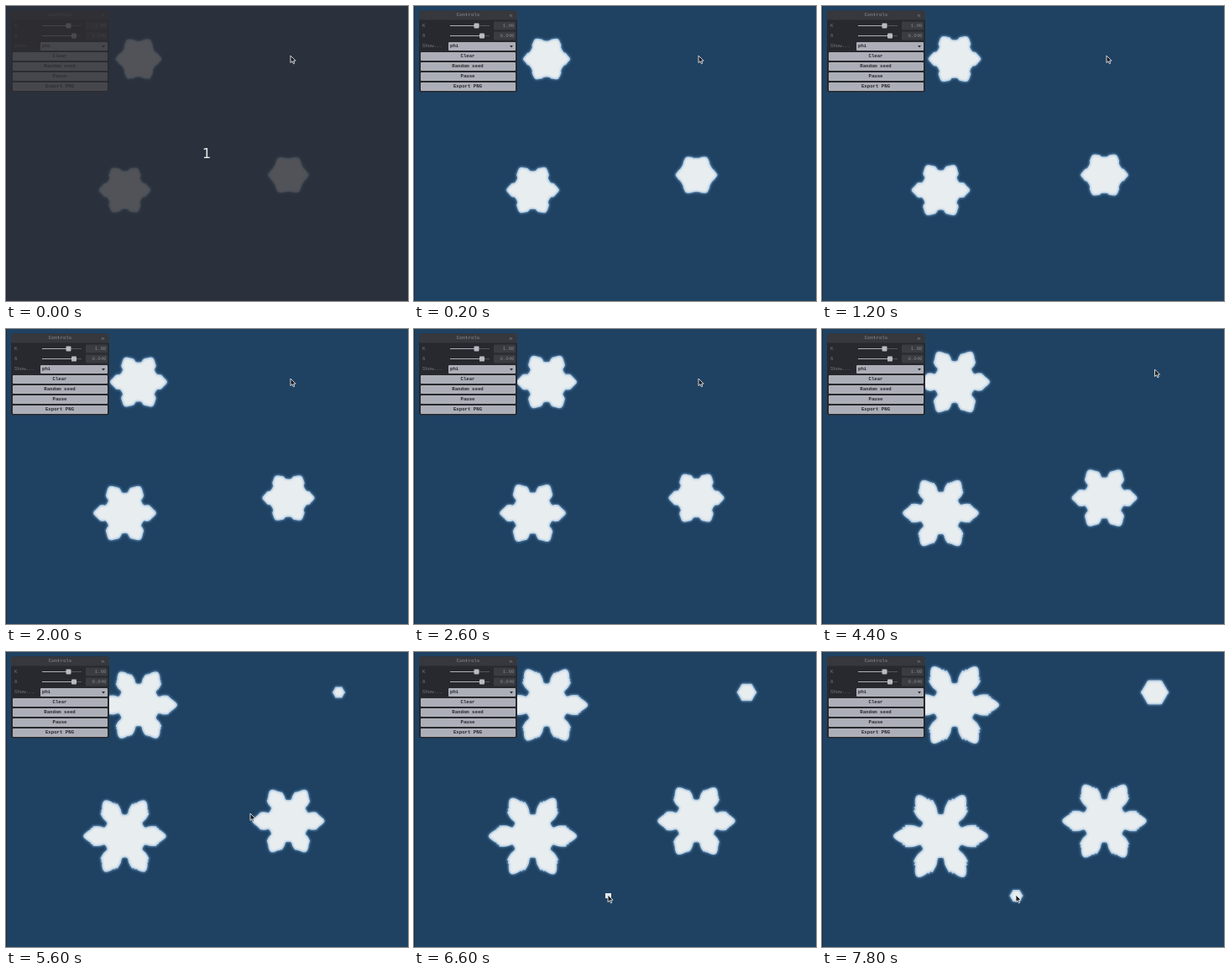
Recreate the animation shown at these times as an HTML page with a canvas. Size 479 px wide and 351 px high, loop 8 s.

```html
<!DOCTYPE html>
<html lang="en">
<head>
<meta charset="utf-8">
<title>Snow crystals</title>
<style>
html, body { margin: 0; width: 100%; height: 100%; overflow: hidden; background: #1f4263; }
canvas { display: block; }
</style>
</head>
<body>
<canvas id="stage" width="479" height="351"></canvas>
<script>
const ctx = document.getElementById('stage').getContext('2d');
const W = 479, H = 351, LOOP = 8000, STEP = 200;
const FONT = '"Liberation Mono", monospace';
const SNOW = '#e8edf0', RIM = 'rgba(112,163,207,0.72)';

// Seeds with a radius have been growing since before the loop starts.
const crystals = [
  { x: 158, y: 63, r: 28 },
  { x: 141.5, y: 219, r: 31.5 },
  { x: 336.5, y: 201, r: 25 },
  { x: 396.5, y: 48, born: 4.45 },
  { x: 231.5, y: 290, born: 6.55 }
];

// Pointer stops: time, x, y
const pointer = [
  [0, 338.5, 58.5], [2800, 338.5, 58.5], [3400, 396, 47.5], [5100, 396, 47.5],
  [5600, 290.5, 191.5], [6000, 247, 264], [6300, 230.5, 288.5], [8000, 230.5, 288.5]
];

function box(x, y, w, h, color, r = 0) {
  ctx.fillStyle = color;
  ctx.beginPath();
  ctx.roundRect(x, y, w, h, r);
  ctx.fill();
}

function text(str, x, y, color, align = 'left', weight = 'normal', size = 5.7, family = FONT) {
  ctx.font = `${weight} ${size}px ${family}`;
  ctx.textAlign = align;
  ctx.textBaseline = 'middle';
  ctx.fillStyle = color;
  ctx.fillText(str, x, y);
}

// One side of an arm lying on the x axis, from near the tip down to the notch.
function armSide(R) {
  const over = Math.max(0, R - 20);
  const notch = Math.min(0.866 * R, 17.3 + 9 * (1 - Math.exp(-over / 13)));
  const fit = Math.min(1, R / 17);
  const rough = Math.max(0, R - 38) * 0.07;
  const outer = [R * (0.866 - 0.0019 * over), 0.3 * R];
  const shoulder = [R * (0.866 - 0.0038 * over), (4.5 + 0.1 * Math.max(0, R - 17)) * fit];
  const pts = [outer];
  for (let i = 1; i < 5; i++) {
    const k = i / 5, bump = (i % 2 ? -1 : 1) * rough;
    pts.push([outer[0] + (shoulder[0] - outer[0]) * k + bump,
              outer[1] + (shoulder[1] - outer[1]) * k]);
  }
  pts.push(shoulder,
    [notch + (shoulder[0] - notch) * 0.5, 4.2 * fit],
    [notch + 0.5 * Math.min(1, over / 10), 3.7 * fit]);
  // s runs along the 30 degree notch line, d is the distance from it
  const toXY = ([s, d]) => [0.866 * s + 0.5 * d, 0.5 * s - 0.866 * d];
  return { side: pts.map(toXY), notch };
}

function outline(R) {
  const { side, notch } = armSide(R);
  const mirror = ([x, y]) => [x, -y];
  const base = mirror([0.866 * notch, 0.5 * notch]);
  const pts = [];
  for (let i = 0; i < 6; i++) {
    const a = i * Math.PI / 3, c = Math.cos(a), s = Math.sin(a);
    const tip = i % 3 ? [[0.975 * R, -0.05 * R], [0.975 * R, 0.05 * R]] : [[1.035 * R, 0]];
    const arm = [base, ...side.map(mirror).reverse(), ...tip, ...side];
    for (const [x, y] of arm) pts.push([x * c - y * s, x * s + y * c]);
  }
  return pts;
}

function smoothPath(pts) {
  const n = pts.length;
  const mid = (p, q) => [(p[0] + q[0]) / 2, (p[1] + q[1]) / 2];
  ctx.beginPath();
  ctx.moveTo(...mid(pts[n - 1], pts[0]));
  pts.forEach((p, i) => ctx.quadraticCurveTo(...p, ...mid(p, pts[(i + 1) % n])));
  ctx.closePath();
}

function crystal(c, sec) {
  const age = sec - (c.born || 0);
  if (age < 0) return;
  if (c.born && age < 0.2) {
    box(c.x - 3.5, c.y - 3, 7, 6, SNOW);
    return;
  }
  const R = c.r ? c.r + 3.4 * age : 3 + 4.6 * age - 0.1 * age * age;
  ctx.save();
  ctx.translate(c.x, c.y);
  smoothPath(outline(R - 0.6));
  ctx.filter = 'blur(0.7px)';
  ctx.fillStyle = SNOW;
  ctx.fill();
  ctx.filter = 'blur(0.9px)';
  ctx.strokeStyle = RIM;
  ctx.lineWidth = 1.9;
  ctx.stroke();
  ctx.restore();
}

function slider(y, label, knob, value) {
  text(label, 10, y, '#77787e');
  box(43, y - 0.5, 47, 1, '#55565c');
  box(43, y - 0.5, knob - 43, 1, '#adafb8');
  box(knob - 3, y - 3, 6, 6, '#b9bbc4', 1);
  box(95, y - 5, 26, 10, '#3b3c41', 1);
  text(value, 119.5, y + 0.3, '#85868c', 'right');
}

function panel() {
  box(6, 5.5, 117, 97, '#28292e', 3);
  box(6, 5.5, 117, 11, '#37383d', [3, 3, 0, 0]);
  text('Controls', 64.5, 10.5, '#92939a', 'center');
  text('n', 115.5, 11.5, '#92939a', 'center');
  slider(23.5, 'K', 74.5, '1.60');
  slider(35.5, 'δ', 81, '0.040');
  text('Show...', 10, 47.5, '#77787e');
  box(41, 43, 80, 10, '#adafb8', 1);
  text('phi', 43, 48, '#28292e', 'left', 'bold');
  ctx.fillStyle = '#28292e';
  ctx.beginPath();
  ctx.moveTo(114, 47);
  ctx.lineTo(118, 47);
  ctx.lineTo(116, 49.5);
  ctx.fill();
  ['Clear', 'Random seed', 'Pause', 'Export PNG'].forEach((name, i) => {
    const y = 55 + i * 12;
    box(8, y, 113, 10, '#adafb8', 1);
    text(name, 64, y + 4.6, '#28292e', 'center', 'bold');
  });
}

function cursor(t) {
  const i = pointer.findIndex(p => p[0] > t);
  const [t0, x0, y0] = pointer[i - 1], [t1, x1, y1] = pointer[i];
  const k = (t - t0) / (t1 - t0);
  ctx.save();
  ctx.translate(x0 + (x1 - x0) * k, y0 + (y1 - y0) * k);
  ctx.beginPath();
  [[0.5, 0.5], [0.5, 9], [2.5, 7.2], [4, 10.3], [5.3, 9.6], [4, 6.8], [6.6, 6.6]]
    .forEach(p => ctx.lineTo(...p));
  ctx.closePath();
  ctx.fillStyle = '#1b1d20';
  ctx.fill();
  ctx.strokeStyle = '#e6e8ea';
  ctx.lineWidth = 0.9;
  ctx.stroke();
  ctx.restore();
}

function draw(t) {
  box(0, 0, W, H, '#1f4263');
  crystals.forEach(c => crystal(c, t / 1000));
  panel();
  box(0, 0, 1, H, '#172f3f');
  if (t < 200) {
    box(0, 0, W, H, 'rgba(46,46,50,0.8)');
    text('1', 239, 176.5, '#eef0f2', 'center', 'normal', 16, '"DejaVu Sans", sans-serif');
  }
  cursor(t);
}

function tick() {
  draw(Math.floor((performance.now() % LOOP) / STEP) * STEP);
  requestAnimationFrame(tick);
}
tick();
</script>
</body>
</html>
```
